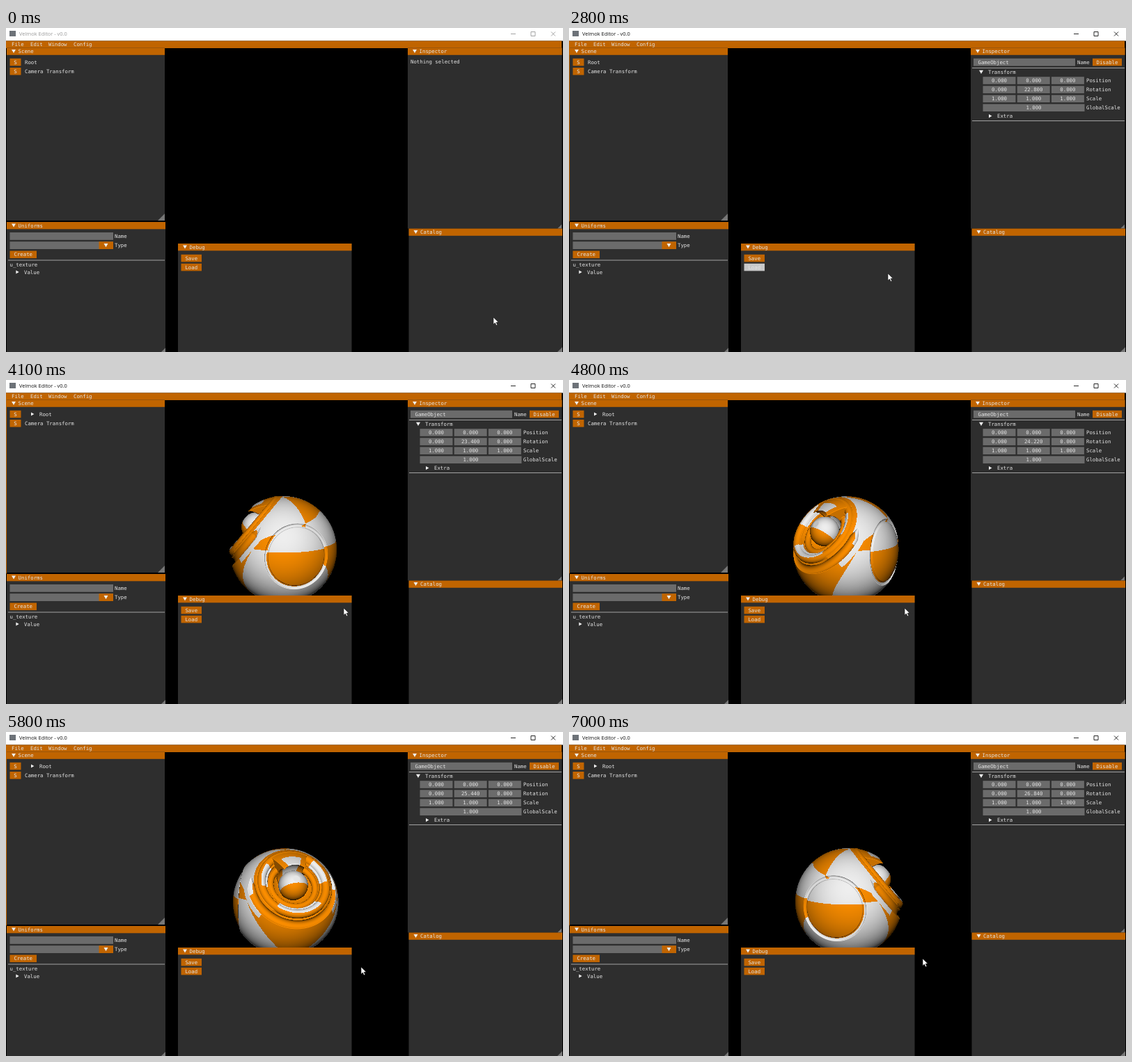
Recreate the animation shown at these times as an HTML page with a canvas. Size 800 px wide and 466 px high, loop 7.1 s.

```html
<!DOCTYPE html>
<html lang="en">
<head>
<meta charset="utf-8">
<title>Editor</title>
<style>
html, body { margin: 0; width: 800px; height: 466px; overflow: hidden; background: #000; }
svg, canvas { position: absolute; left: 0; top: 0; }
canvas { left: 318px; top: 160px; filter: blur(.4px); }
text { font: 7.35px "DejaVu Sans Mono", monospace; fill: #e4e4e4; white-space: pre; }
.caption { font: 7.45px "Open Sans", sans-serif; }
</style>
</head>
<body>
<canvas id="ball" width="164" height="150"></canvas>
<svg id="ui" width="800" height="466" viewBox="0 0 800 466"></svg>
<script>
const LOOP = 7100, STEP = 100;
const SELECT = 1200, PRESS = 2500, LOADED = 3700;
const ORANGE = '#c06400', PANEL = '#2e2e2e', FIELD = '#6b6b6b';
const ui = document.getElementById('ui');

function add(tag, attrs, parent = ui) {
  const node = document.createElementNS('http://www.w3.org/2000/svg', tag);
  for (const key in attrs) node.setAttribute(key, attrs[key]);
  return parent.appendChild(node);
}
const group = () => add('g', {});
const rect = (x, y, width, height, fill, parent) => add('rect', { x, y, width, height, fill }, parent);
const path = (d, attrs, parent) => add('path', { d, ...attrs }, parent);

// Labels are placed by their vertical centre.
function label(x, y, string, parent, anchor = 'start') {
  const node = add('text', { x, y: y + 2.6, 'text-anchor': anchor }, parent);
  node.textContent = string;
  return node;
}
function box(x, y, w, string, fill = ORANGE, parent = ui, h = 10.6) {
  const face = rect(x, y, w, h, fill, parent);
  return { face, text: label(x + w / 2, y + h / 2, string, parent, 'middle') };
}
const down = (x, y, parent) => path(`M${x - 3} ${y - 2.6}h6l-3 5.2z`, { fill: '#eee' }, parent);
const right = (x, y, parent) => path(`M${x - 2} ${y - 2.6}v5.2l4.4 -2.6z`, { fill: '#eee' }, parent);
const rule = (x, y, w, parent) => rect(x, y, w, 1, '#a2a2a2', parent);
const grip = (x, y, size) => path(`M${x} ${y}h${-size}l${size} ${-size}z`, { fill: '#777' });

function panel(x, y, w, bottom, title) {
  rect(x, y, w, bottom - y, PANEL);
  rect(x, y, w, 10.3, ORANGE);
  down(x + 10, y + 5);
  label(x + 16.6, y + 5.2, title);
}

// Window frame and menu
rect(0, 0, 800, 18.5, '#fff');
rect(5, 4, 9, 8, '#6d7278');
const caption = add('text', { x: 19, y: 11.4, class: 'caption' });
caption.textContent = 'Velmok Editor - v0.0';
const controls = path('M725 8.5h7M754 5.5h6v6h-6zM783 5.5l6 6M789 5.5l-6 6', { fill: 'none', 'stroke-width': .9 });
rect(0, 18.5, 798, 10.5, ORANGE);
[[8, 'File'], [35, 'Edit'], [61, 'Window'], [97, 'Config']].forEach(([x, s]) => label(x, 23.6, s));

// Scene
panel(1, 28.5, 227, 277, 'Scene');
const rootButton = box(5.5, 43.8, 16, 'S');
box(5.5, 57, 16, 'S');
const rootArrow = right(38, 49);
const rootLabel = label(27, 49, 'Root');
label(27, 62.3, 'Camera Transform');
grip(228, 277, 10);

// Uniforms
panel(1, 279, 228, 466, 'Uniforms');
rect(5.5, 294, 148.5, 10.8, FIELD);
rect(5.5, 307.2, 148.5, 10.8, FIELD);
rect(133.5, 307.2, 20.5, 10.8, ORANGE);
down(143.5, 312.6);
label(156, 299.6, 'Name');
label(156, 312.8, 'Type');
box(5.5, 320.5, 38.5, 'Create');
rule(3, 333.5, 225);
label(5.5, 340.5, 'u_texture');
right(16.3, 351);
label(26, 351, 'Value');
grip(229, 466, 6);

// Debug
panel(247, 310, 249.5, 466, 'Debug');
box(251.5, 325.8, 29.5, 'Save');
const loadButton = box(251.5, 338.8, 29.5, 'Load');

// Inspector
panel(577, 28.5, 221.5, 288.5, 'Inspector');
const emptyNote = label(581, 48.3, 'Nothing selected');
const details = group();
rect(581, 43.8, 146, 10.8, FIELD, details);
label(587.5, 49.2, 'GameObject', details);
label(730, 49.2, 'Name', details);
box(752, 43.8, 42, 'Disable', ORANGE, details);
rule(579, 57, 219, details);
down(592, 63.4, details);
label(602, 63.8, 'Transform', details);
let rotation;
['Position', 'Rotation', 'Scale'].forEach((name, row) => {
  const y = 70.2 + row * 13.1;
  for (let col = 0; col < 3; col++) {
    const cell = box(594.5 + col * 49.2, y, 47, row === 2 ? '1.000' : '0.000', FIELD, details);
    if (row === 1 && col === 1) rotation = cell.text;
  }
  label(743, y + 5.3, name, details);
});
box(594.5, 109.4, 146, '1.000', FIELD, details);
label(743, 114.8, 'GlobalScale', details);
right(605, 126.6, details);
label(615, 126.8, 'Extra', details);
rule(579, 133, 219, details);
grip(798, 288.5, 6);

// Catalog
panel(578.5, 288.5, 220.5, 466, 'Catalog');
grip(799, 466, 7);

const accent = rect(0, 18.5, 1, 260, ORANGE);
const cursor = path('M0 0v10.2l2.4-2.1 1.7 3.6 1.7-.8-1.7-3.5 3.1-.3z',
  { fill: '#fff', stroke: '#111', 'stroke-width': .6 });

// Material ball: a sphere with a carved face, a visor, an inner core and side caps
const canvas = document.getElementById('ball'), ctx = canvas.getContext('2d');
const image = ctx.createImageData(canvas.width, canvas.height);
const RADIUS = 76.5, CENTRE_X = 82, CENTRE_Y = 84, TILT = .2;
const { sqrt, max, min, abs, sin, cos, atan2, asin, floor, PI } = Math;
const len = (a, b) => sqrt(a * a + b * b);
const faceAxis = (y, z) => .63 * y + .78 * z;
const faceUp = (y, z) => .78 * y - .63 * z;
const capAxis = (x, y, z) => .89 * abs(x) + .03 * y - .455 * z;

function distance(x, y, z) {
  const rr = x * x + y * y + z * z;
  const h = faceAxis(y, z), ring = sqrt(max(0, rr - h * h));
  const s = capAxis(x, y, z), q = sqrt(max(0, rr - s * s));
  let d = sqrt(rr) - 1;
  if (s > 0) {
    if (q < .57) d += .03;
    d = max(d, .04 - len(q - .59, s - .8));
  }
  if (z > 0) d += .05 * max(0, min(1, 3 * (1 - len(x / .55, (y + .02) / .18))));
  if (h > 0) {
    const up = faceUp(y, z);
    const visor = max(.16 - up, abs(x) - .12 - .4 * max(0, up));
    const lower = max(0, min(1, (.3 - up) * 4));
    d = max(d, .09 * lower - len(ring - .81, h - .61));
    d = max(d, min(h - .7, visor));
    d = min(d, len(ring - .62, h - .69) - .08);
    d = max(d, min(.53 - len(ring, h - .85), visor), .37 - len(ring, h - .72));
    d = min(d, len(ring - .43, h - .62) - .06, len(ring, h - .66) - .27);
  }
  return d;
}

function isWhite(x, y, z) {
  const rr = x * x + y * y + z * z, h = faceAxis(y, z), ring = sqrt(max(0, rr - h * h));
  const up = faceUp(y, z), around = abs(atan2(x, up));
  if (h > .3 && ring < .76) {
    if (len(ring, h - .66) < .285) return up > -.08;
    if (ring > .64) return false;
    return ring > .5 ? floor(around / .8) % 2 === 1 : around < .4;
  }
  if (h > .3 && ring > .85 && ring < .9 && around > 1.3 && around < 2.2) return true;
  const lat = asin(max(-1, min(1, y / sqrt(rr)))) * 180 / PI;
  const lon = abs(atan2(x, z)) * 180 / PI;
  const s = capAxis(x, y, z), rise = lat - 10;
  if (s > 0 && rr - s * s < .33) return lat > 8;
  const front = lon < 64 + (rise < 0 ? .6 * rise : .08 * rise * rise);
  const above = rise > 2 * max(0, 64 - lon);
  const back = lon > 132 + max(0, -rise);
  return (front + above + back) % 2 === 0;
}

function drawBall(yaw) {
  const ct = cos(TILT), st = sin(TILT), cy = cos(yaw), sy = sin(yaw);
  const local = (x, y, z) => {
    const depth = z * ct - y * st;
    return [x * cy - depth * sy, y * ct + z * st, x * sy + depth * cy];
  };
  const [dx, dy, dz] = local(0, 0, 1), [lx, ly, lz] = local(0, .25, .968);
  const data = image.data;
  data.fill(0);
  for (let row = 0; row < canvas.height; row++) for (let col = 0; col < canvas.width; col++) {
    const vx = (col + .5 - CENTRE_X) / RADIUS, vy = (CENTRE_Y - row - .5) / RADIUS;
    if (vx * vx + vy * vy > 1.15) continue;
    let [x, y, z] = local(vx, vy, 1.08);
    z -= .025;
    let d = 1;
    for (let i = 0, far = 0; i < 45 && far < 2.2; i++) {
      d = distance(x, y, z);
      if (d < .004) break;
      const step = d * .8;
      far += step;
      x -= dx * step; y -= dy * step; z -= dz * step;
    }
    if (d > .02) continue;
    const e = .012;
    const nx = distance(x + e, y, z) - distance(x - e, y, z);
    const ny = distance(x, y + e, z) - distance(x, y - e, z);
    const nz = distance(x, y, z + e) - distance(x, y, z - e);
    const facing = (nx * lx + ny * ly + nz * lz) / (sqrt(nx * nx + ny * ny + nz * nz) || 1);
    const light = .2 + .8 * max(0, facing) ** .8;
    const [r, g, b] = isWhite(x, y, z) ? [238, 238, 238] : [252, 142, 0];
    const at = 4 * (row * canvas.width + col);
    data[at] = r * light; data[at + 1] = g * light; data[at + 2] = b * light; data[at + 3] = 255;
  }
  ctx.putImageData(image, 0, 0);
}

// Keys: time, then values
const cursorKeys = [[0, 700, 416], [500, 606, 366], [800, 480, 333], [1200, 15, 52], [1600, 15, 52],
  [2300, 262, 341], [2600, 262, 341], [2800, 458, 353], [3200, 487, 340], [3600, 487, 340],
  [4100, 485, 328], [4800, 482, 328], [5800, 510, 338], [7000, 508, 326]];
const turnKeys = [[1200, 21.34], [2500, 22.72], [2600, 22.72], [2800, 22.8], [3200, 23], [3400, 23],
  [3500, 23.04], [3600, 23.04], [4100, 23.4], [4800, 24.22], [5800, 25.44], [7000, 26.84]];

function track(keys, t) {
  const next = keys.findIndex(key => key[0] > t);
  if (next < 0) return keys[keys.length - 1].slice(1);
  if (next === 0) return keys[0].slice(1);
  const a = keys[next - 1], b = keys[next], k = (t - a[0]) / (b[0] - a[0]);
  return a.slice(1).map((v, i) => v + (b[i + 1] - v) * k);
}
const show = (node, on) => node.setAttribute('visibility', on ? 'visible' : 'hidden');

function render(t) {
  const selected = t >= SELECT, loaded = t >= LOADED;
  const ink = selected ? '#111' : '#999';
  caption.style.fill = ink;
  controls.setAttribute('stroke', ink);
  show(accent, selected);
  show(details, selected);
  show(emptyNote, !selected);
  show(rootArrow, loaded);
  rootLabel.setAttribute('x', loaded ? 48 : 27);
  rootButton.face.setAttribute('fill', selected && t < 1500 ? '#0f80e8' : ORANGE);
  loadButton.face.setAttribute('fill', t >= PRESS && !loaded ? '#c8c8c8' : ORANGE);
  const turn = Math.round(track(turnKeys, t)[0] * 50) / 50;
  rotation.textContent = turn.toFixed(3);
  cursor.setAttribute('transform', `translate(${track(cursorKeys, t)})`);
  canvas.style.visibility = loaded ? 'visible' : 'hidden';
  if (loaded) drawBall(turn);
}

const start = performance.now();
let shown = -1;
function tick() {
  const t = floor((performance.now() - start) % LOOP / STEP) * STEP;
  if (t !== shown) render(shown = t);
  requestAnimationFrame(tick);
}
tick();
</script>
</body>
</html>
```
